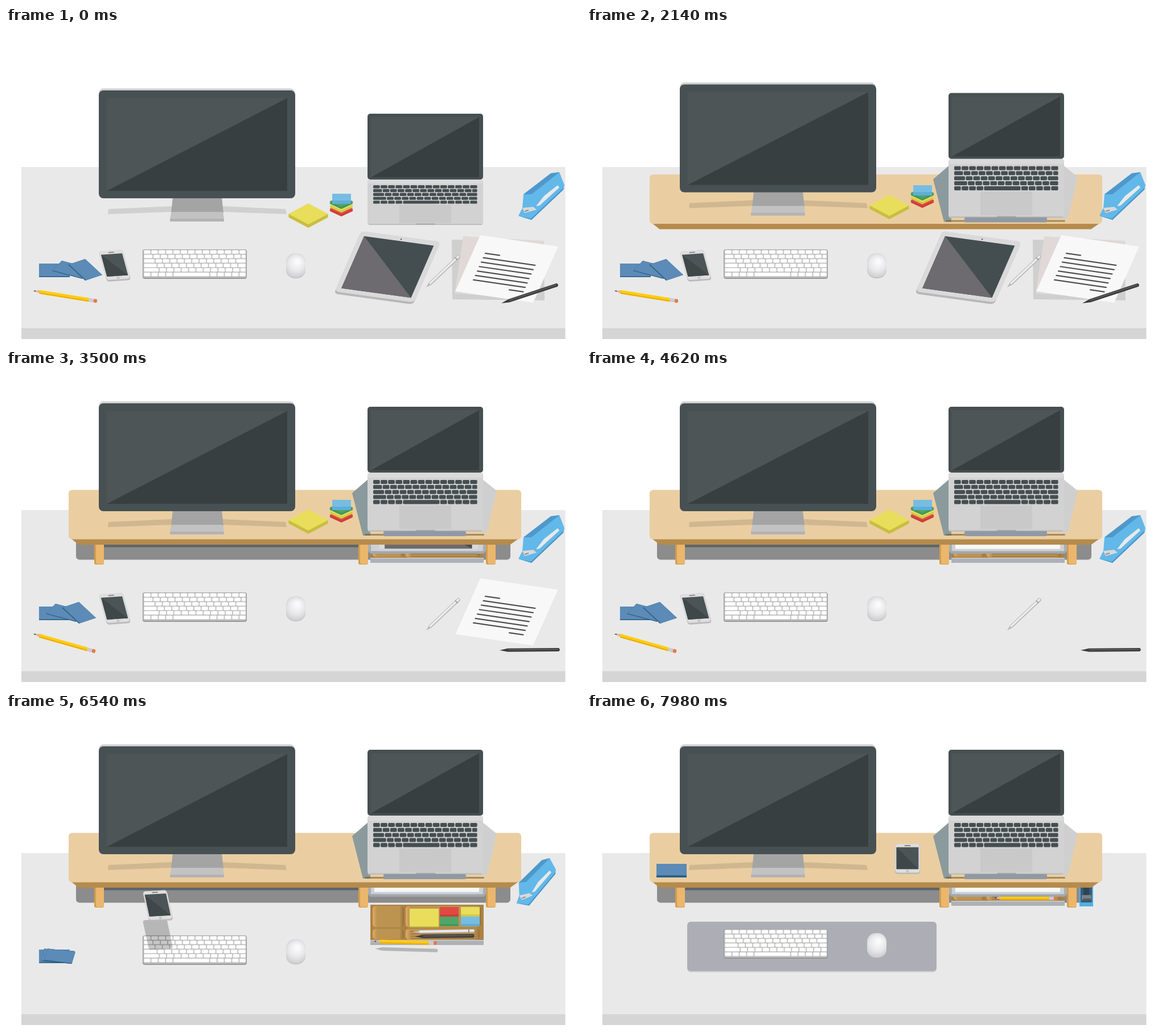
An HTML page with a canvas that plays this animation: 1010x555 px, repeating every 8 s.

```html
<!DOCTYPE html>
<html lang="en">
<head>
<meta charset="utf-8">
<title>Tidy desk</title>
<style>
html, body { margin: 0; overflow: hidden; background: #fff; }
canvas { display: block; }
</style>
</head>
<body>
<canvas id="stage" width="1010" height="555"></canvas>
<script>
const c = document.getElementById('stage').getContext('2d');
const LOOP = 8000;
let t = 0;

// Timing: every motion is a ramp from 0 to 1, a hop (0, 1, 0) or a springy ramp.
const share = (start, dur) => Math.min(1, Math.max(0, (t - start) / dur));
const ramp = (start, dur) => { const k = share(start, dur); return k * k * (3 - 2 * k); };
const hop = s => Math.sin(Math.PI * s);
const spring = (start, dur) => { const k = share(start, dur) - 1; return 1 + 3.1 * k ** 3 + 2.1 * k ** 2; };
const lerp = (a, b, s) => a.map((v, i) => v + (b[i] - v) * s);
const curve = (a, mid, b, s) => lerp(lerp(a, mid, s), lerp(mid, b, s), s);

// Things on the shelf move up twice: onto the low shelf, then with it.
function climb(first, second, jump1, jump2) {
  const a = ramp(1560, 580), b = ramp(2140, 520);
  return -(first * a + second * b + jump1 * hop(a) + jump2 * hop(b));
}

function poly(fill, p) {
  c.beginPath();
  for (let i = 0; i < p.length; i += 2) c.lineTo(p[i], p[i + 1]);
  c.closePath();
  c.fillStyle = fill;
  c.fill();
}
function box(fill, x, y, w, h, r = 0) {
  c.beginPath();
  c.roundRect(x, y, w, h, r);
  c.fillStyle = fill;
  c.fill();
}
function group(x, y, draw) {
  c.save();
  c.translate(x, y);
  draw();
  c.restore();
}
const shifted = (p, x, y) => p.map((v, i) => v + (i % 2 ? y : x));
const rect = (x, y, w, h) => [x, y, x + w, y, x + w, y + h, x, y + h];
const diamond = (x, y, w, h) => [x - w, y, x, y - h, x + w, y, x, y + h];

function slab(p, depth, top, side) {
  for (let d = depth; d > 0; d--) poly(side, shifted(p, 0, d));
  poly(top, p);
}
// Draws a 100 x 100 picture on the parallelogram [x, y, ux, uy, vx, vy].
function plane([x, y, ux, uy, vx, vy], draw, lift = 0) {
  const place = (dy, paint) => group(x, y + dy, () => {
    c.transform(ux / 100, uy / 100, vx / 100, vy / 100, 0, 0);
    paint();
  });
  if (lift > 1) place(lift, () => box('rgba(0,0,0,.22)', 0, 0, 100, 100, 8));
  place(0, draw);
}
// Draws a 110 px long picture from one end point to the other.
function stick([x1, y1, x2, y2], draw, lift = 0) {
  const place = (dx, dy, paint) => group(x1 + dx, y1 + dy, () => {
    c.rotate(Math.atan2(y2 - y1, x2 - x1));
    c.scale(Math.hypot(x2 - x1, y2 - y1) / 110, 1);
    paint();
  });
  if (lift > 1) place(2, lift, () => barrel('#b5b5b5', 12));
  place(0, 0, draw);
}
const barrel = (fill, tip) => poly(fill, [0, 0, tip, -3, 108, -3, 110, 0, 108, 3, tip, 3]);

// Each row starts with a wider key than the one above; the last holds the space bar.
function keyRows(fill, x, y, right, rows, pitch, rowH, gap, space) {
  for (let r = 0; r < rows; r++) {
    const last = r === rows - 1;
    let w = last ? pitch : pitch * (1 + .28 * r);
    for (let left = x; left < right - 5; left += w, w = pitch) {
      if (last && left >= space && left < space + pitch) w = 5 * pitch;
      if (right - left - w < 7) w = right - left;
      box(fill, left, y + r * rowH, w - gap, rowH - gap, 1.5);
    }
  }
}
function screen(x, y, w, h) {
  box('#4d5557', x, y, w, h);
  poly('#383f41', [x + w, y, x + w, y + h, x, y + h]);
}

function monitor() {
  group(0, climb(10.5, 42.5, 0, 70), () => {
    poly('rgba(0,0,0,.11)', [180, 319, 290, 314, 381, 314, 491, 319, 493, 328, 381, 324, 290, 324, 179, 328]);
    poly('#a4a4a4', [293, 298, 379, 298, 382, 326, 290, 326]);
    poly('#c2c2c2', [290.5, 324, 381, 324, 383, 337, 288, 337]);
    box('#b3b3b3', 288, 336, 95, 5, 1);
    box('#d0d2d2', 163, 106.5, 344, 30, 8);
    box('#475052', 163, 110, 345, 190, 8);
    screen(177, 123.5, 317, 163.5);
  });
}

function laptop() {
  const stand = ramp(1620, 260);
  group(0, 267 + climb(36.5, 51.5, 25, 60), () => {
    if (stand) {
      const tuck = 28 * (1 - stand);
      poly('#8b9a9c', shifted([638, 10, 608, 36, 627, 111, 640, 111], tuck, 0));
      poly('#cfcfcf', shifted([836, 11, 862, 32, 845, 104, 836, 108], -tuck, 0));
      box('rgba(110,80,30,.55)', 630, 108, 210, 3, 2);
    }
    group(0, 0, () => {
      c.scale(1, 1 + .3 * stand);
      box('#d2d2d2', 635, 0, 203, 80, 4);
      box('#dadada', 636, 0, 201, 7, 2);
      box('#bdbdbd', 637, 78, 199, 2, 2);
      keyRows('#454e50', 645, 10, 829, 5, 13.1, 6.8, 1.4, 690);
      box('#c9c9c9', 691, 44.5, 91, 32, 1);
      box('#a5a7a8', 720, 77.5, 34, 2, 1);
    });
    if (stand > .5) box('#909aa4', 663, 103, 145, 9, 2);
    box('#464f51', 635, -116, 203, 116, 5);
    screen(641, -110, 190, 106);
  });
}

function shelf() {
  const scale = spring(1540, 440);
  if (!scale) return;
  group(507.5, 258 + 49 * (1 - spring(2140, 480)), () => {
    c.scale(scale, scale);
    poly('#b58b4d', [-395, 36, 395, 36, 378, 48, -380, 48]);
    box('#eacea2', -397.5, -48.5, 795, 87, 6);
  });
}

function drawer(open) {
  const cup = (x, y, w, h) => {
    const shade = c.createLinearGradient(x, 0, x + w, 0);
    shade.addColorStop(0, '#dfac66');
    shade.addColorStop(8 / w, '#bd9350');
    shade.addColorStop(1 - 8 / w, '#bd9350');
    shade.addColorStop(1, '#94703a');
    box(shade, x, y, w, h, 6);
  };
  group(0, open - 69, () => {
    box('#ac8244', 640, 336, 199, 63);
    cup(644, 338, 55, 38);
    cup(644, 378, 55, 19);
    cup(702, 338, 132, 38);
    cup(702, 378, 130, 20);
    for (let i = 0; i < 4; i++) box('#8f6a33', 711, 383 + i * 4, 115, 1);
    box('#adb0b6', 640, 398, 199, 9);
    box('#c2c4c9', 640, 398, 199, 2);
  });
}

function tablet() {
  box('#b7b7b7', 0, 0, 100, 102, 5);
  box('#dadada', 0, 0, 100, 98.5, 5);
  box('#444e51', 6, 7, 88, 85);
  poly('#6d6b70', [6, 7, 94, 92, 6, 92]);
  box('#444', 51, 3, 1.5, 2, 1);
}
function page() {
  box('#f8f8f8', 0, 0, 100, 100);
  for (let i = 0; i < 8; i++) {
    const left = i === 7 ? 63.5 : 15;
    box('#484848', left, 28 + i * 7.9, (i ? 83 : 35) - left, 2, 1);
  }
}

// The tray slides out twice: for the tablet, then for the stacked sheets.
function tray(visible) {
  const out = 80 * (hop(ramp(2500, 900)) + hop(ramp(3700, 900)));
  if (visible) {
    box('#a9aeb3', 636, 226 + out, 207, 96, 7);
    box('#cdd1d5', 641, 230 + out, 197, 86, 5);
  }
  plane(lerp([624, 358, 139, 19, -47, 108], [655, 230 + out, 174, 0, 0, 90], ramp(2600, 420)), tablet);

  const top = [833, 365, 137, 20, -44, 99], stored = [647, 226 + out, 184, 0, 0, 88];
  const sheet = (pose, draw) => plane(lerp(lerp(pose, top, ramp(2700, 600)), stored, ramp(3620, 560)), draw);
  sheet([783, 373, 162, 2, 1, 105], () => box('#cfcfcf', 0, 0, 100, 100));
  sheet([803, 367, 142, 8, -15, 101], () => box('#e1d8d8', 0, 0, 100, 100));
  sheet(top, page);
  if (visible) {
    box('#cdd1d5', 641, 313.5 + out, 197, 4);
    box('#a2a7ac', 638, 317.5 + out, 203, 4.5, [0, 0, 6, 6]);
  }
}

function legs() {
  for (const x of [155, 619, 843]) {
    box('#d39c4e', x, 303, 17, 38, 3);
    box('#ebb76c', x + 3, 303, 14, 37, 3);
  }
}

function pencil() {
  poly('#dfb88b', [0, 0, 12, -3, 12, 3]);
  poly('#333', [0, 0, 4, -1.2, 4, 1.2]);
  box('#ffcc10', 11, -3, 85, 6.5);
  box('#eeae08', 11, 1.3, 85, 2.2);
  box('#cbcbd2', 96, -3, 8, 6.5);
  box('#e77845', 104, -3, 6, 6.5, 2);
}
function blackPen() {
  barrel('#3b3b3b', 15);
  box('#5d5d5d', 15, -1.5, 92, 2);
}
function whitePen() {
  barrel('#b9b9b9', 14);
  box('#eee', 12, -2, 96, 3.2, 1);
  box('#8d8d8d', 98, -3, 2, 6);
}

function stickyNotes() {
  const rise = 65 + climb(15, 50, 15, 45);
  const s = ramp(5080, 620), turn = share(5420, 280);
  const [x, y] = curve([0, 0], [132, 129], [204, 96], s);
  const pad = diamond(531 + x, 262.5 + y + rise, 35, 18.5);
  if (s > 0 && s < 1) poly('rgba(0,0,0,.12)', shifted(pad, 8, 24 * hop(s)));
  slab(lerp(pad, rect(709, 343, 51, 31), turn), 6 - 4 * turn, '#e8de5b', '#c9be40');

  // From the bottom of the stack to the top; the top one leaves first.
  const colours = [['#e14a42', '#cf3f38'], ['#e8de5b', '#d3c94c'], ['#52a568', '#45985b'], ['#77bde2', '#5faed8']];
  colours.forEach(([top, side], i) => {
    const start = 5320 - 100 * i;
    const stacked = i === 3 ? rect(573, 227, 33, 12) : diamond(589, 253.5 - 6.5 * i, 20.5, 9.5);
    const place = curve([573, 227], [600, 390], [762 + 37 * (i % 2), 340 + 17 * (i >> 1)], ramp(start, 700));
    const flat = share(start, 100);
    slab(lerp(shifted(stacked, 0, rise), rect(...place, 33, 13), flat), i === 3 || flat === 1 ? 6 - 2 * share(start + 500, 200) : 4, top, side);
  });
}

function stationery(open) {
  group(0, t > 6800 ? open - 69 : 0, () => {
    stickyNotes();
    const white = ramp(5250, 500), black = ramp(5700, 550), yellow = ramp(5580, 1200);
    group(0, 40 * hop(white), () => stick(lerp([738, 457, 797, 401], [714, 384, 824, 382], white), whitePen));
    const flatBlack = lerp([870, 485, 970, 452], [867, 492, 973, 491], ramp(2750, 450));
    stick(lerp(flatBlack, [718, 392, 823, 391], black), blackPen, 18 * hop(black));
    const turned = lerp([48, 463, 160, 481], [48, 463, 157, 494], ramp(2700, 500));
    stick(lerp(turned, [715, 393, 826, 393], yellow), pencil, 42 * hop(yellow));
  });
}

function cards() {
  const slide = -11 * ramp(2650, 550), jump = ramp(7350, 370);
  const pile = [58, 415, 54, 0, 0, 24];
  const spread = [pile, [98 + slide, 410, 53, 14, -17, 18], [139 + slide, 407, 30, 28, -30, 10]];
  spread.forEach((pose, i) => {
    const gathered = lerp(pose, pile, ramp(6150 - 50 * i, 700));
    plane(lerp(gathered, [122, 264, 53, 0, 0, 24], jump), () => {
      box('#2d5f86', 0, 0, 100, 100);
      box('#5b8bb6', 0, 0, 100, 94 - 10 * jump);
    }, 35 * hop(jump));
  });
}

function phone() {
  const s = ramp(6280, 900);
  group(0, -80 * hop(s), () => plane(lerp([163, 394, 42, -3, 14, 52], [541, 229, 44, 0, 0, 52], s), () => {
    box('#b9b9b9', 0, 0, 100, 102, 10);
    box('#dedede', 1, 0, 98, 97, 10);
    box('#4b5456', 6, 11, 88, 74);
    poly('#3f4749', [6, 11, 94, 85, 6, 85]);
    box('#777', 38, 4, 24, 3, 1);
    box('#c2c2c2', 44, 88, 12, 8, 5);
  }, 85 * hop(s)));
}

function stapler() {
  const s = ramp(6420, 480);
  const [x, y, angle, scale] = lerp([941, 296, 0, 1], [877, 365, -.75, .6], s);
  group(x, y - 22 * hop(s), () => {
    c.rotate(angle);
    c.scale(scale, scale);
    c.translate(-941, -296);
    poly('#62b8e9', [900, 331, 907, 317, 909, 293, 957, 256, 972, 254, 981, 277, 979, 284, 923, 338]);
    poly('#4a93c8', [900, 331, 922, 336, 980, 281, 979, 285, 923, 338]);
    poly('#e9e9e9', [931, 314, 945, 296, 969, 277, 972, 281, 937, 313]);
    poly('#4f98cb', [909, 293, 957, 256, 972, 254, 923, 293]);
    poly('#d9d9d9', [907, 317, 926, 315, 932, 320, 911, 326]);
    poly('#888', [911, 322, 918, 320, 918, 322, 911, 324]);
  });
}
function storedStapler() {
  group(0, 42 * (1 - ramp(6900, 280)), () => {
    box('#4fb0e4', 865, 300, 24, 39);
    box('#3a5a70', 867, 300, 20, 32, 2);
    box('#2e4354', 872, 300, 10, 19);
    box('#7a8288', 869, 319, 17, 9, 1);
    box('#555e64', 871, 325, 14, 3);
  });
}

function mat() {
  const scale = spring(7120, 440);
  if (!scale) return;
  group(395, 410, () => {
    c.scale(scale, scale);
    box('#cfcfd0', -219, -42, 438, 87, 6);
    box('#adadb5', -219, -44, 438, 87, 6);
  });
}
function keyboardAndMouse() {
  const s = ramp(7100, 460);
  group(0, -11 * s - 16 * hop(s), () => {
    box('#979797', 240, 390, 183, 52, 4);
    box('#c0c0c0', 241, 390.5, 181, 49.5, 3);
    keyRows('#fff', 242.5, 391.5, 422.5, 6, 12.9, 7.9, 1.7, 294);
    const shine = c.createRadialGradient(512, 411, 3, 509, 418, 25);
    shine.addColorStop(0, '#fafafc');
    shine.addColorStop(.5, '#e8e8ea');
    shine.addColorStop(1, '#c6c6c8');
    box('#bbb', 492, 398, 34, 43, 15);
    box(shine, 492, 397, 34, 43, 15);
  });
}

function frame(now) {
  t = now % LOOP;
  const open = 69 * (ramp(4880, 400) - ramp(6850, 350));
  const raised = t > 2150, stored = t > 6300, stapled = t > 6900;
  box('#fff', 0, 0, 1010, 555);
  box('#e9e9e9', 27, 245, 955.5, 284);
  box('#d5d5d5', 27, 529, 955.5, 19);
  mat();
  if (raised) {
    box('#8c8c8c', 123, 290, 763, 42.5, 6);
    box('#5d656a', 171, 304, 450, 6.5);
    if (stapled) storedStapler();
    drawer(open);
  }
  if (stored) stationery(open);
  tray(raised);
  if (raised) legs();
  shelf();
  monitor();
  laptop();
  if (!stapled) stapler();
  keyboardAndMouse();
  if (!stored) stationery(open);
  cards();
  phone();
  requestAnimationFrame(frame);
}
requestAnimationFrame(frame);
</script>
</body>
</html>
```
